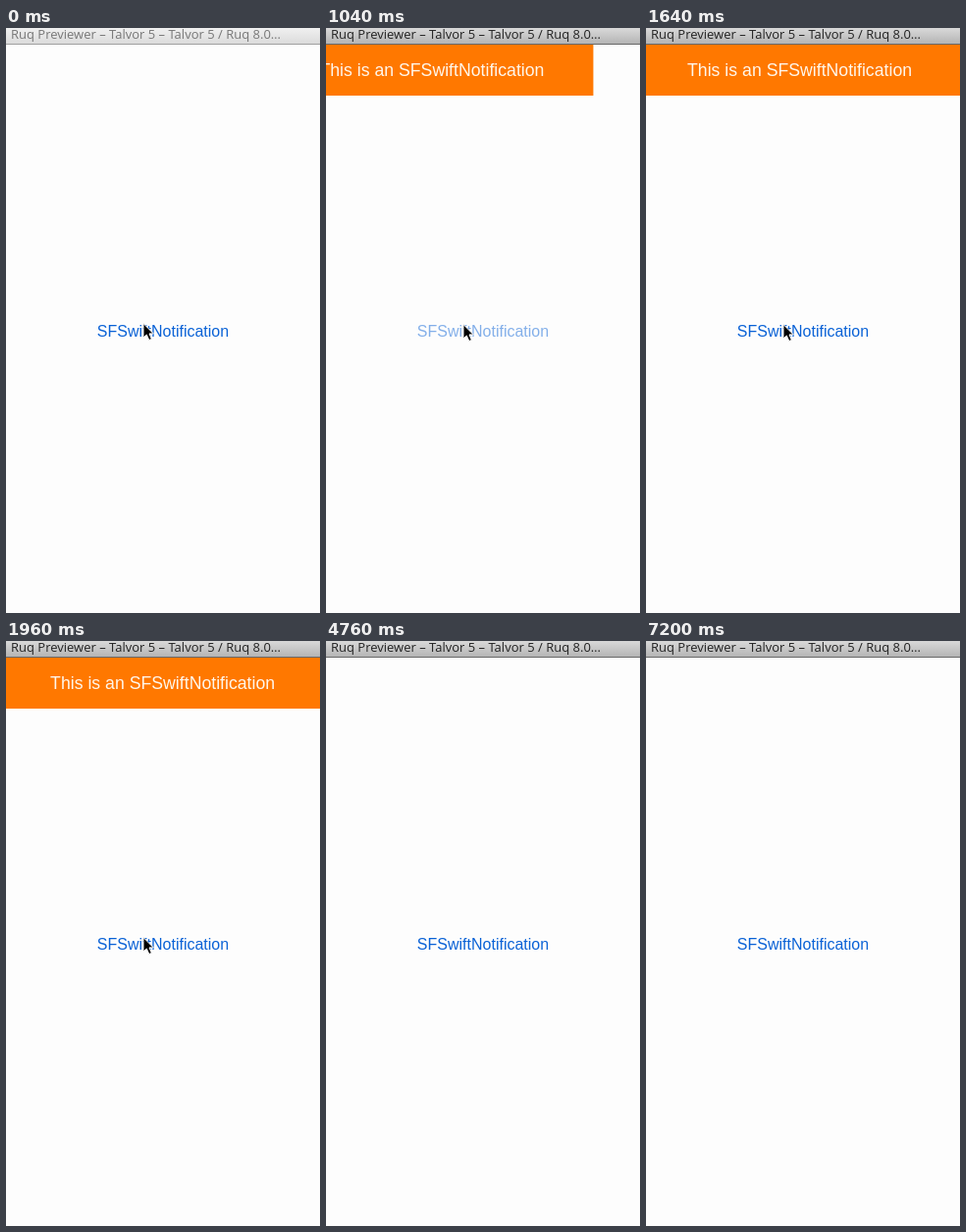
Animation of 320 by 597 pixels, one loop 7240 ms. Source, as an HTML page:

```html
<!DOCTYPE html>
<html lang="en">
<head>
<meta charset="utf-8">
<style>
html, body { margin: 0; width: 100%; height: 100%; overflow: hidden; background: #fdfdfd; }
svg { display: block; width: 320px; height: 597px; }
text { font-family: "Liberation Sans", Arial, sans-serif; }
#title { font: 13px "Open Sans", sans-serif; }
</style>
</head>
<body>
<svg viewBox="0 0 320 597">
  <defs>
    <linearGradient id="active" x2="0" y2="1"><stop stop-color="#d9d9d9"/><stop offset="1" stop-color="#b2b2b2"/></linearGradient>
    <linearGradient id="inactive" x2="0" y2="1"><stop stop-color="#f0f0f0"/><stop offset="1" stop-color="#dadada"/></linearGradient>
  </defs>
  <g id="banner">
    <rect x="-4" y="17" width="328" height="52" fill="#ff7800"/>
    <text x="159.5" y="49" font-size="17.7" text-anchor="middle" fill="#fff6ea">This is an SFSwiftNotification</text>
  </g>
  <rect id="bar" width="320" height="17"/>
  <rect id="edge" y="16" width="320" height="1"/>
  <text id="title" x="5" y="11" >Ruq Previewer – Talvor 5 – Talvor 5 / Ruq 8.0…</text>
  <text id="button" x="160" y="314.5" font-size="16" text-anchor="middle" fill="#0a62d6">SFSwiftNotification</text>
  <path id="cursor" d="M0 0V14.5L3.3 11.4 5.8 17 8.4 15.9 6 10.4H10.3Z" stroke="#fff" stroke-width="1"/>
</svg>
<script>
const LOOP = 7240, STEP = 40;
const ACTIVATE = 360, PRESS = 680, SHOW = 810, CURSOR_OFF = 3100, HIDE = 3880;
const TRAVEL = 328;
const el = id => document.getElementById(id);
const clamp = (v, lo, hi) => Math.min(hi, Math.max(lo, v));

// Remaining distance (1 to 0) of a spring with damping ratio 0.6.
function spring(ms) {
  if (ms <= 0) return 1;
  const a = ms * 0.00754;
  return Math.exp(-0.75 * a) * (Math.cos(a) + 0.75 * Math.sin(a));
}

function bannerX(t) {
  return t < HIDE ? -TRAVEL * spring(t - SHOW) : -TRAVEL * (1 - spring(t - HIDE));
}

function buttonAlpha(t) {
  if (t < PRESS) return 1;
  return clamp(0.2 + (t - SHOW) * 0.0013, 0.2, 1);
}

function draw(t) {
  const active = t >= ACTIVATE;
  el("bar").setAttribute("fill", `url(#${active ? "active" : "inactive"})`);
  el("edge").setAttribute("fill", active ? "#686868" : "#a0a0a0");
  el("title").setAttribute("fill", active ? "#222" : "#777");
  el("banner").setAttribute("transform", `translate(${bannerX(t).toFixed(2)} 0)`);
  el("button").setAttribute("opacity", buttonAlpha(t));
  el("cursor").setAttribute("transform", `translate(140 ${active ? 302.5 : 301.5})`);
  el("cursor").setAttribute("visibility", t < CURSOR_OFF ? "visible" : "hidden");
}

const start = performance.now();
function tick() {
  const t = (performance.now() - start) % LOOP;
  draw(Math.floor(t / STEP) * STEP);
  requestAnimationFrame(tick);
}
tick();
</script>
</body>
</html>
```
